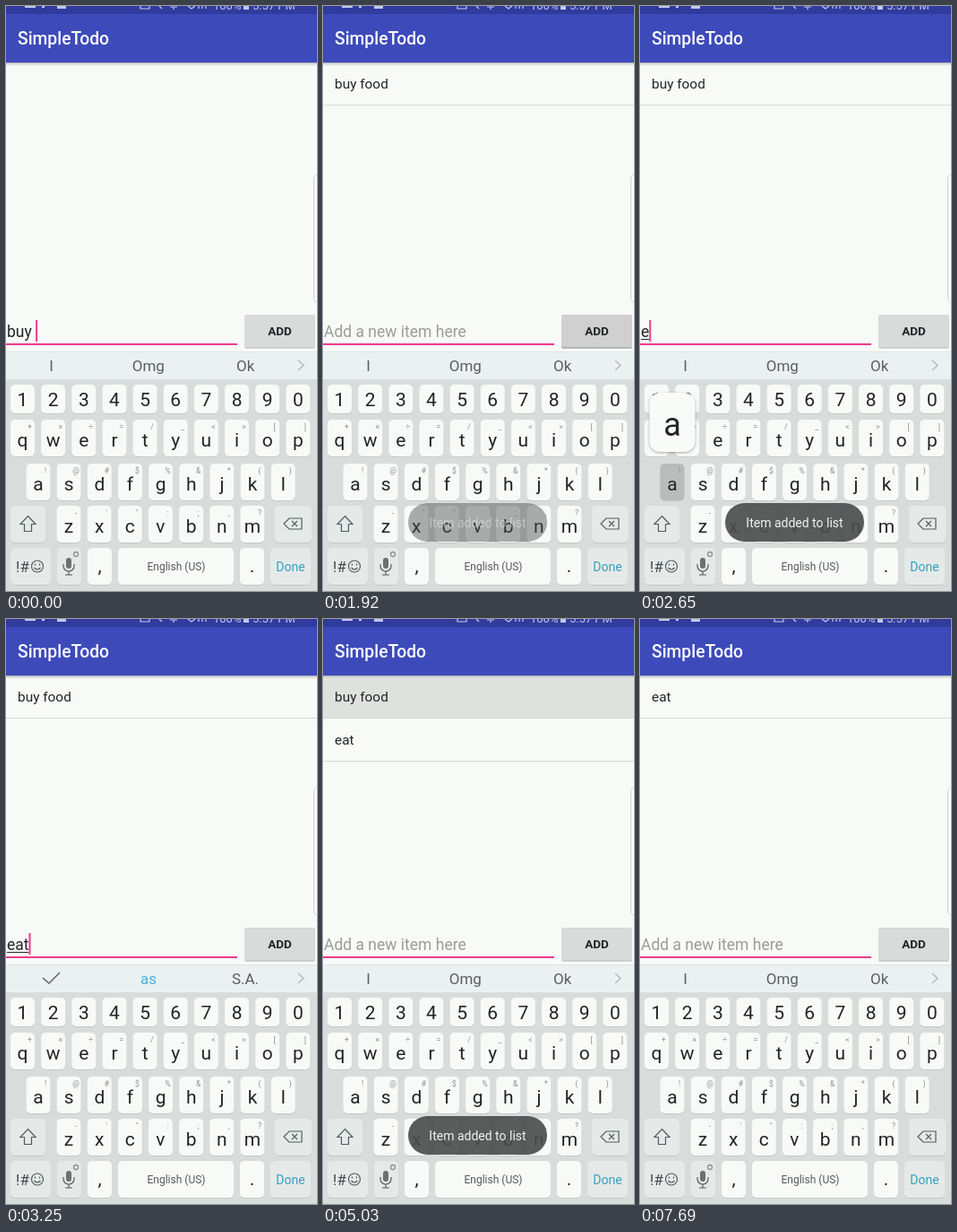
Animation of 347x652 px, one loop 7990 ms. Source, as an HTML page with a canvas:

```html
<!DOCTYPE html>
<html>
<head>
<meta charset="utf-8">
<style>
html, body { margin: 0; width: 100%; height: 100%; overflow: hidden; background: #f8faf7; }
canvas { display: block; }
</style>
</head>
<body>
<canvas id="stage" width="347" height="652"></canvas>
<script>
const ctx = document.getElementById('stage').getContext('2d');
const LOOP = 7990;
const INK = '#222526', PINK = '#ec3b8e', BLUE = '#35a0bd', KEY = '#f8faf8', SIDE = '#e5eae9';

// [start time, value]: each value holds until the next one
const typed = [[0, 'buy '], [290, 'buy f'], [440, 'buy fo'], [740, 'buy foo'], [880, 'buy food'],
  [1770, ''], [2500, 'e'], [2800, 'ea'], [3100, 'eat'], [4140, '']];
const pressed = [[0, ''], [140, 'f'], [290, 'o'], [440, ''], [590, 'o'], [740, 'd'], [880, ''],
  [2360, 'e'], [2500, ''], [2650, 'a'], [2800, ''], [2950, 't'], [3100, '']];
const items = [[0, []], [1770, ['buy food']], [4140, ['buy food', 'eat']], [5615, ['eat']]];
const caret = [[0, 1], [1917, 0], [2500, 1], [4590, 0], [5174, 1], [5615, 0], [6350, 1],
  [6940, 0], [7240, 1], [7390, 0]];
const addDown = [[0, 0], [1624, 1], [2064, 0], [3990, 1], [4590, 0]];
const rowDown = [[0, 0], [5027, 1], [5615, 0]];
const hints = [[0, 0], [2800, 1], [4140, 0]];

const at = (steps, t) => steps.filter(s => s[0] <= t).pop()[1];
const clamp = (v, a, b) => Math.max(a, Math.min(b, v));

function rect(x, y, w, h, color) {
  ctx.fillStyle = color;
  ctx.fillRect(x, y, w, h);
}

function round(x, y, w, h, r, color) {
  ctx.beginPath();
  ctx.roundRect(x, y, w, h, r);
  ctx.fillStyle = color;
  ctx.fill();
}

function text(s, x, y, size, color = INK, align = 'left', weight = 400) {
  ctx.font = `${weight} ${size}px Roboto, sans-serif`;
  ctx.textAlign = align;
  ctx.fillStyle = color;
  ctx.fillText(s, x, y);
}

function line(d, color, width = 1.2) {
  ctx.strokeStyle = color;
  ctx.lineWidth = width;
  ctx.stroke(new Path2D(d));
}

function key(x, y, w, h, color = KEY) {
  round(x, y + 1, w, h, 5, '#c3c9c8');
  round(x, y, w, h, 5, color);
}

function header() {
  rect(0, 0, 347, 9, '#303b9d');
  rect(0, 9, 347, 54, '#3d4aba');
  const g = ctx.createLinearGradient(0, 63, 0, 68);
  g.addColorStop(0, '#aeb1b4');
  g.addColorStop(1, '#f8faf700');
  rect(0, 63, 347, 5, g);
  const pale = '#c3c8ec';
  rect(21, 0, 12, 2, pale);
  rect(40, 0, 3, 2, pale);
  rect(57, 0, 10, 3, pale);
  line('M150 0v3h10v-3M171 0l3 3M183 1h8M187 1v3M203 0l4 3 4-3M215 3v-3M219 3v-3M223 3v-3', pale);
  text('100%', 231, 3.5, 13, pale);
  rect(265, 0, 6, 4, pale);
  text('5:57 PM', 275, 3.5, 13, pale);
  text('SimpleTodo', 13, 43, 19.3, '#fcfcff', 'left', 500);
}

function list(t) {
  if (at(rowDown, t)) rect(0, 63, 347, 47, '#dfe1df');
  at(items, t).forEach((s, i) => {
    text(s, 13, 92 + i * 48, 15.4);
    rect(0, 110 + i * 48, 347, 1, '#d6d9d6');
  });
  // edge panel handle
  ctx.beginPath();
  ctx.roundRect(343.5, 187.5, 20, 143, 5);
  ctx.fillStyle = '#fafcfa';
  ctx.fill();
  ctx.strokeStyle = '#cdd0ce';
  ctx.lineWidth = 1;
  ctx.stroke();
}

function entry(t) {
  const s = at(typed, t), size = 17.5, base = 369;
  rect(0, 376, 258, 2, PINK);
  text(s || 'Add a new item here', 1, base, size, s ? INK : '#9a9c9b');
  const width = w => ctx.measureText(w).width;
  const end = 1 + (s ? width(s) : 0);
  const from = 1 + width(s.slice(0, s.lastIndexOf(' ') + 1));
  if (s && end > from) rect(from, 371, end - from, 1, INK);
  if (at(caret, t)) rect(end, 350, 2, 24, PINK);

  const down = at(addDown, t);
  round(266, 345, 79, 37, 2, down ? '#b4b6b5' : '#cdd0cf');
  round(266, 344, 79, 36, 2, down ? '#cfd0cf' : '#d8dbda');
  text('ADD', 305.5, 366.5, 13.5, INK, 'center', 700);
}

function suggestions(t) {
  rect(0, 385, 347, 31, '#ebf0f1');
  rect(0, 385, 347, 1, '#dfe4e5');
  const gray = '#596064';
  if (at(hints, t)) {
    line('M41 400l7 6 12-12', gray, 1.4);
    text('as', 159, 407, 17, '#3fb5dc', 'center');
    text('S.A.', 267, 407, 17, gray, 'center');
  } else {
    ['I', 'Omg', 'Ok'].forEach((s, i) => text(s, 50.5 + i * 108.3, 407, 17, gray, 'center'));
  }
  line('M326 395l6 5.5-6 5.5', '#b4babd', 1.4);
}

const rows = [
  ['1234567890', '', 18.5, 422, 32],
  ['qwertyuiop', '+×÷=/_<>[]', 18.5, 461, 41],
  ['asdfghjkl', '!@#$%&*()', 36, 510, 41],
  ['zxcvbnm', '-\'":;,?', 70, 557, 41]
];

function keyboard(t) {
  rect(0, 416, 347, 236, '#d8dddc');
  const down = at(pressed, t);
  let popup;
  for (const [chars, marks, x0, y, h] of rows) {
    [...chars].forEach((c, i) => {
      const x = x0 + i * 34.15;
      key(x - 13.5, y, 27, h, c === down ? '#b8bdbc' : KEY);
      text(c, x, y + (marks ? 30 : 23.5), 21, INK, 'center');
      if (marks) text(marks[i], x + 8, y + 11, 8.5, '#8b9090', 'center');
      if (c === down) popup = [c, x, y];
    });
  }
  key(5, 557, 39, 41, SIDE);
  key(300, 557, 41, 41, SIDE);
  key(5, 604, 45, 41, SIDE);
  key(57, 604, 27, 41, SIDE);
  key(91, 604, 27, 41);
  key(125, 604, 129, 41);
  key(261, 604, 27, 41);
  key(295, 604, 45, 41, SIDE);

  const gray = '#555a5c';
  line('M24.500 568.500l8.500 9h-4.500v8h-8v-8h-4.500z', gray);
  line('M316 571h14v12h-14l-6-6zM319 574l6 6M325 574l-6 6', gray);
  text('!#', 11, 631, 17, '#44494a');
  line('M41.500 624.500a6.500 6.500 0 1 1-13 0a6.500 6.500 0 1 1 13 0M31.500 626q3.500 4 7 0M32.500 621.500v2M37.500 621.500v2', gray);
  round(67, 615, 6, 12, 3, '#6b7072');
  line('M64 622v2a6 6 0 0 0 12 0v-2M70 630v4M66 634h8', gray);
  line('M80.500 611a2.500 2.500 0 1 1-5 0a2.500 2.500 0 1 1 5 0', '#8b9090', 1.3);
  text(',', 104.500, 631, 21, INK, 'center');
  text('English (US)', 190, 629, 12, gray, 'center');
  text('.', 274.500, 631, 21, INK, 'center');
  text('Done', 317.500, 630, 14, BLUE, 'center');
  return popup;
}

function bubble([c, x, y]) {
  const left = clamp(x - 25.5, 2, 294);
  ctx.save();
  ctx.shadowColor = '#0005';
  ctx.shadowBlur = 3;
  ctx.shadowOffsetY = 1;
  round(left, y - 79, 51, 66, 12, '#f9fbf9');
  ctx.restore();
  text(c, left + 25.5, y - 31, 36, INK, 'center');
}

function toast(t, start, end) {
  const alpha = clamp(Math.min((t - start) / 300, (end - t) / 300), 0, 1);
  if (!alpha) return;
  ctx.globalAlpha = alpha;
  round(95, 554, 155, 43, 21.5, 'rgba(75,78,78,.91)');
  text('Item added to list', 172.500, 581, 14, '#f1f2f1', 'center');
  ctx.globalAlpha = 1;
}

function draw(now) {
  const t = now % LOOP;
  rect(0, 0, 347, 652, '#f8faf7');
  list(t);
  header();
  if (t >= 5760 && t < 5910) rect(0, 67, 347, 1, '#dee0de');
  entry(t);
  suggestions(t);
  const popup = keyboard(t);
  if (popup) bubble(popup);
  toast(t, 1770, 3250);
  toast(t, 3990, 5615);
  requestAnimationFrame(draw);
}

const begin = performance.now();
requestAnimationFrame(function first() {
  const loop = () => draw(performance.now() - begin);
  const next = window.requestAnimationFrame.bind(window);
  draw = (old => now => old(Math.max(0, performance.now() - begin)))(draw);
  loop();
});
</script>
</body>
</html>
```
